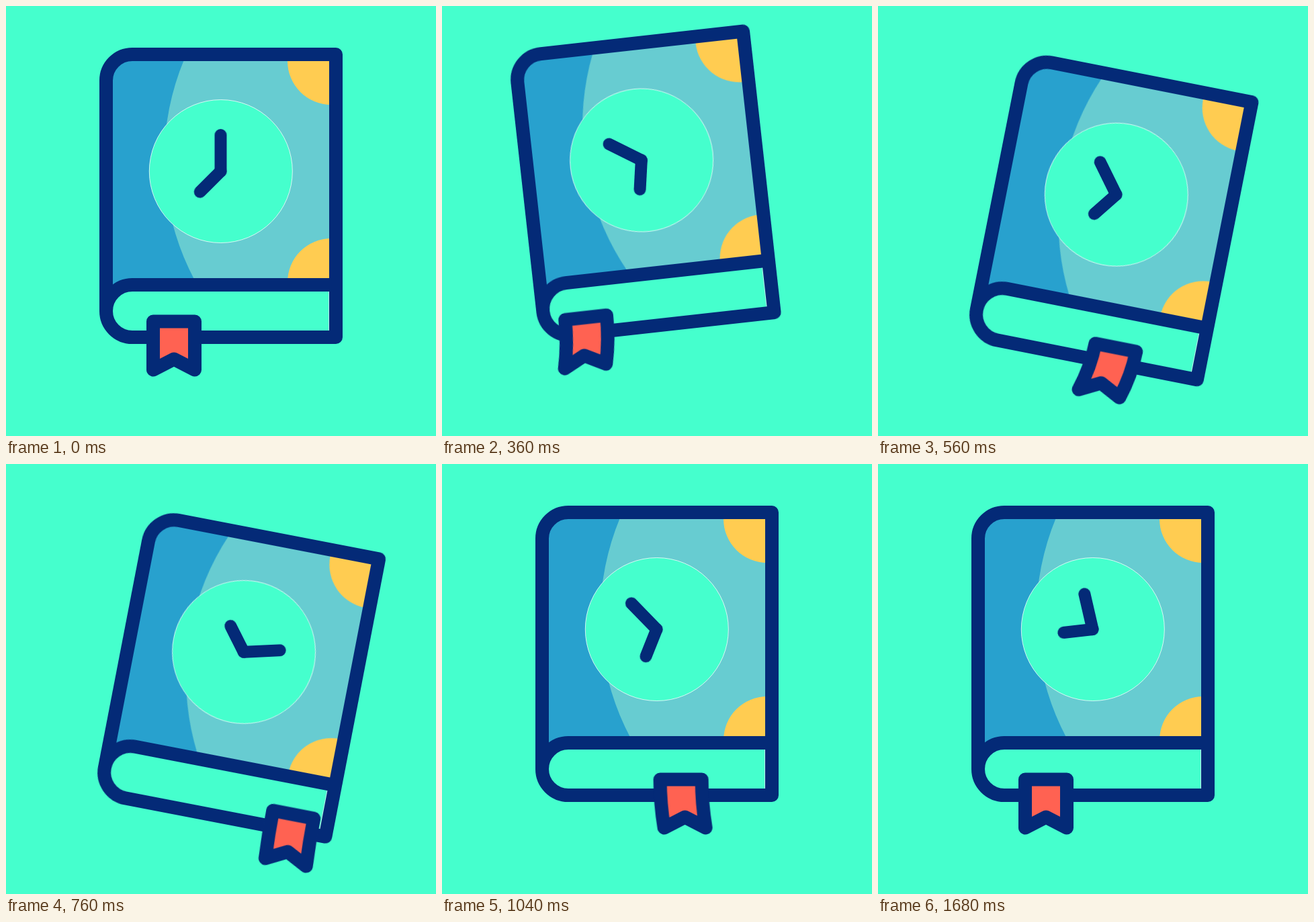
Recreate the animation shown at these times as an HTML page without scripts. Size 640x640 px, loop 2200 ms.

```html
<!DOCTYPE html>
<html lang="en">
<head>
<meta charset="utf-8">
<title>Book with clock</title>
<style>
  :root {
    --mint: #45ffcd;
    --navy: #042a77;
    --smooth: cubic-bezier(.333, 0, .667, 1);
    --snap: cubic-bezier(.75, 0, .25, 1);
  }
  html, body { margin: 0; width: 100%; height: 100%; overflow: hidden; background: var(--mint); }
  svg { display: block; width: 100vw; height: 100vh; }

  .line { fill: none; stroke: var(--navy); stroke-width: 20; stroke-linecap: round; stroke-linejoin: round; }
  .hand { stroke-width: 18; }
  .ribbon { fill: #ff6252; }
  .hairline { stroke: #fff; stroke-width: 1; stroke-opacity: .75; }

  .book, .minute, .hour, .slide, .ribbon { animation: 2200ms var(--smooth) infinite; }
  .book { transform-origin: 160px 442px; animation-name: tilt; }
  .minute { animation-name: minute; }
  .hour { animation-name: hour; }
  .slide { animation-name: slide; animation-timing-function: var(--snap); }
  .ribbon { animation-name: bend; }

  @keyframes tilt {
    0% { transform: rotate(0deg); }
    12.27% { transform: rotate(-10deg); }
    29.09% { transform: rotate(14deg); }
    47.27%, 100% { transform: rotate(0deg); }
  }
  @keyframes minute {
    0% { transform: rotate(0deg); }
    12.73% { transform: rotate(-58.4deg); animation-timing-function: cubic-bezier(.765, 0, .084, 1); }
    65.45%, 100% { transform: rotate(347deg); }
  }
  @keyframes hour {
    0% { transform: rotate(225deg); }
    12.73% { transform: rotate(187.5deg); animation-timing-function: cubic-bezier(.643, 0, .312, 1); }
    65.45%, 100% { transform: rotate(623.5deg); }
  }
  @keyframes slide {
    0% { transform: translateX(0); }
    14.55% { transform: translateX(-40px); }
    34.55% { transform: translateX(188px); }
    60.91%, 100% { transform: translateX(0); }
  }
  /* The ribbon's tail lags behind its top edge. */
  @keyframes bend {
    0%, 70.91%, 100% { d: path("M-31 0h62q0 36 0 72l-31 -16l-31 16q0 -36 0 -72z"); }
    5% { d: path("M-31 0h62q0 36 5 72l-31 -16l-31 16q-5 -36 -5 -72z"); }
    21.82% { d: path("M-31 0h62q0 36 -13 72l-31 -16l-31 16q13 -36 13 -72z"); }
    42.73% { d: path("M-31 0h62q0 36 10 72l-31 -16l-31 16q-10 -36 -10 -72z"); }
    59.09% { d: path("M-31 0h62q0 36 -11 72l-31 -16l-31 16q11 -36 11 -72z"); }
  }
</style>
</head>
<body>
<svg viewBox="0 0 640 640">
  <defs>
    <clipPath id="cover"><path d="M491 72H188A39 39 0 0 0 149 111V415H491Z"/></clipPath>
  </defs>
  <g class="book">
    <g clip-path="url(#cover)">
      <path fill="#28a1ce" d="M149 72H491V415H149Z"/>
      <circle cx="619.6" cy="227.4" r="384" fill="#67ccd1"/>
      <g fill="#ffcc51">
        <circle cx="484" cy="82" r="65"/>
        <circle cx="484" cy="411" r="65"/>
      </g>
    </g>
    <circle class="hairline" cx="319.8" cy="246" r="106.5" fill="#45ffcd"/>
    <path class="hairline" d="M480.7 425V484"/>
    <path class="line" d="M491 72H188A39 39 0 0 0 149 111V454A39 39 0 0 0 188 493H491ZM149 454A39 39 0 0 1 188 415H491"/>
    <g transform="translate(319.5 246)">
      <path class="line hand minute" d="M0 0V-54"/>
      <path class="line hand hour" d="M0 0V-43.5"/>
    </g>
    <g class="slide">
      <g transform="translate(250 469.5)">
        <path class="line ribbon" style="fill:#ff6252" d="M-31 0h62q0 36 0 72l-31 -16l-31 16q0 -36 0 -72z"/>
      </g>
    </g>
  </g>
</svg>
</body>
</html>
```
